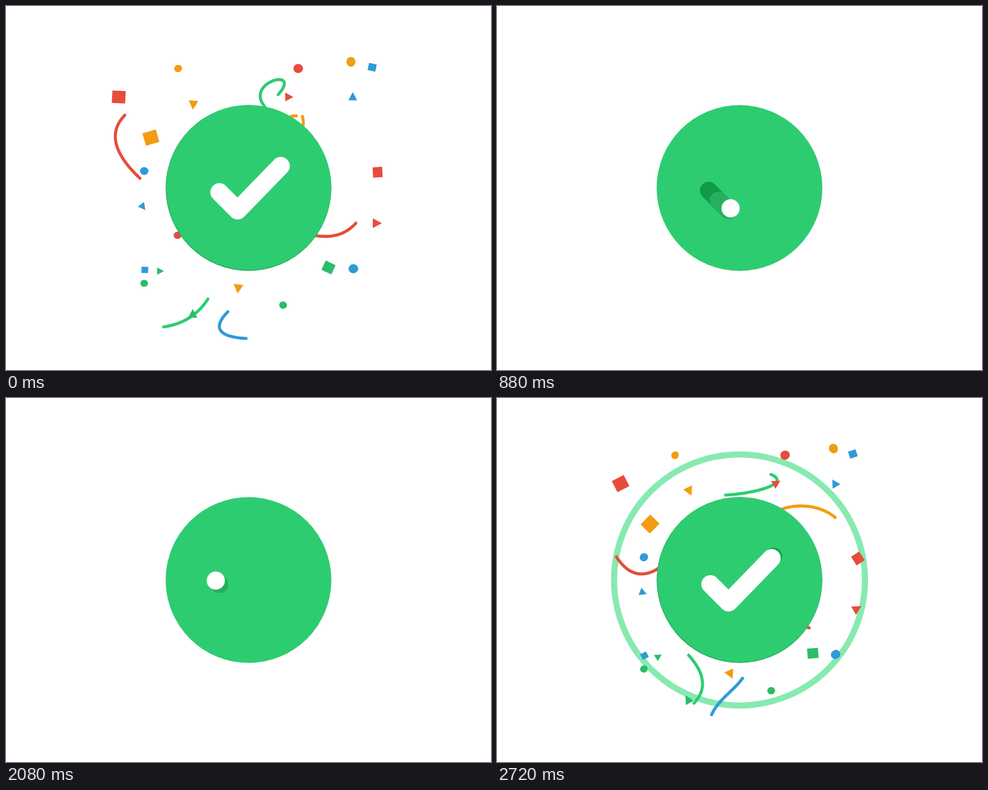
An HTML page with a canvas that plays this animation: 800 by 600 pixels, repeating every 2800 ms.

```html
<!DOCTYPE html>
<html lang="en">
<head>
<meta charset="utf-8">
<title>Success check</title>
<style>
html, body { margin: 0; width: 100%; height: 100%; overflow: hidden; background: #fff; }
canvas { display: block; width: 800px; height: 600px; }
</style>
</head>
<body>
<canvas id="stage" width="800" height="600"></canvas>
<script>
const ctx = document.getElementById('stage').getContext('2d');
const LOOP = 2800, STEP = 80, BURST = 2320, TAU = Math.PI * 2;
const CX = 400, CY = 300, RADIUS = 136.7;
const RED = '#e74c3c', ORANGE = '#f39c12', BLUE = '#2e9bd9', GREEN = '#2ecc71', LEAF = '#2bbd69';
const MID = '#27ae60', DARK = '#0f9a48';

const mix = (a, b, u) => a + (b - a) * u;
const clamp = u => Math.min(1, Math.max(0, u));
const easeOut = (u, p) => 1 - (1 - clamp(u)) ** p;
const easeInOut = u => (1 - Math.cos(Math.PI * u)) / 2;
const arch = u => Math.sin(Math.PI * clamp(u));

const dot = s => ctx.arc(0, 0, s, 0, TAU);
const square = s => ctx.rect(-s / 2, -s / 2, s, s);
const triangle = s => {
  for (let i = 0; i < 3; i++) ctx.lineTo(s * Math.cos(i * TAU / 3), s * Math.sin(i * TAU / 3));
  ctx.closePath();
};

// shape, colour, resting x, y, size, angle
const pieces = [
  [dot, ORANGE, 284, 103, 6.5, -20],
  [dot, ORANGE, 569, 92, 8, 90],
  [dot, RED, 482, 103, 8, 0],
  [dot, RED, 283, 378, 6.5, 0],
  [dot, BLUE, 228, 272, 7, 0],
  [dot, BLUE, 573, 433, 8, -5],
  [dot, LEAF, 228, 457, 6.3, 0],
  [dot, LEAF, 457, 493, 6.5, 20],
  [square, RED, 186, 150, 22, 3],
  [square, RED, 613, 274, 17, 87],
  [square, ORANGE, 239, 217, 23, -16],
  [square, BLUE, 604, 101, 13, 12],
  [square, BLUE, 229, 435, 11, 2],
  [square, LEAF, 532, 431, 18, 25],
  [triangle, ORANGE, 309, 161, 10, 95],
  [triangle, ORANGE, 383, 464, 10, 95],
  [triangle, RED, 465, 150, 9, 0],
  [triangle, RED, 610, 358, 10, 0],
  [triangle, BLUE, 572, 151, 9, -90],
  [triangle, BLUE, 225, 330, 8, 52],
  [triangle, LEAF, 253, 437, 7.5, 0],
  [triangle, LEAF, 308, 509, 9.5, -90]
];

// colour, then Bezier control points while flying and at rest
const ribbons = [
  [RED, [266, 281, 226, 306, 197, 262], [221, 284, 155, 222, 196, 180]],
  [GREEN, [377, 160, 430, 157, 485, 140, 452, 126], [427, 166, 392, 125, 490, 100, 449, 146]],
  [ORANGE, [470, 183, 500, 173, 535, 178, 558, 197], [479, 181, 440, 180, 500, 230, 489, 182]],
  [RED, [500, 375, 508, 377, 515, 379], [508, 378, 552, 386, 577, 358]],
  [BLUE, [405, 462, 390, 483, 365, 497, 354, 522], [366, 504, 345, 525, 342, 545, 396, 548]],
  [GREEN, [316, 424, 357, 469, 325, 503], [333, 483, 308, 522, 260, 529]]
];

function disc(x, y, r, color) {
  ctx.fillStyle = color;
  ctx.beginPath();
  ctx.arc(x, y, r, 0, TAU);
  ctx.fill();
}

function ring(inner, outer, color) {
  ctx.strokeStyle = color;
  ctx.lineWidth = outer - inner;
  ctx.beginPath();
  ctx.arc(CX, CY, (inner + outer) / 2, 0, TAU);
  ctx.stroke();
}

// n counts steps since the burst; pieces pass their resting place at n = 6
function piece([shape, color, x, y, size, angle], n) {
  const u = n / 6, fade = 1 - clamp((n - 7) / 5);
  const lift = 64 * u * (1 - u);
  ctx.save();
  ctx.translate(mix(CX, x, easeOut(n / 8, 2) / easeOut(6 / 8, 2)), mix(140, y, easeOut(u, 3)) - lift);
  ctx.rotate((angle + 30 * Math.min(n - 6, 2)) * Math.PI / 180);
  ctx.scale(fade, fade * .93);
  ctx.fillStyle = color;
  ctx.beginPath();
  shape(size);
  ctx.fill();
  ctx.restore();
}

function bezier(p, u) {
  while (p.length > 2) p = p.slice(2).map((v, i) => mix(p[i], v, u));
  return p;
}

function ribbon([color, flying, rest], n) {
  const trim = clamp((n - 6) / 5);
  if (n < 2 || trim === 1) return;
  const grow = easeOut(n / 5, 2), turn = clamp(n - 5);
  const pts = flying.map((v, i) => mix(mix(i % 2 ? CY : CX, v, grow), rest[i], turn));
  ctx.strokeStyle = color;
  ctx.lineWidth = 5;
  ctx.beginPath();
  for (let i = 0; i <= 40; i++) ctx.lineTo(...bezier(pts, mix(trim, 1, i / 40)));
  ctx.stroke();
}

function confetti(n) {
  if (n >= 12) return;
  ribbons.forEach(r => ribbon(r, n));
  pieces.forEach(p => piece(p, n));
}

function wave(t) {
  const u = (t - 2240) / 480;
  if (u <= 0) return;
  const inner = mix(120, 202, u), outer = mix(RADIUS, 212, easeOut(u, 2.5));
  ring(inner, outer, '#87eab0');
  if (u > .4) return;
  ring(outer - 9, outer, '#62de95');
  ring(outer - 9, outer - 4.5, '#4fd688');
}

// the check as one path measured in px from its start
const CORNER = 50.9, START = 8.5, END = 153;
const along = s => s < CORNER
  ? [346 + s * .7071, 301 + s * .7071]
  : [382 + (s - CORNER) * .697, 337 - (s - CORNER) * .717];

// trimmed span of a layer; order 0 is the white one, 1 and 2 are its shadows
function span(t, order) {
  if (t <= 640) {
    const u = easeInOut(clamp((t - 240) / 400));
    return [mix(START, 4.2, u), mix(END, 4.2, u)];
  }
  if (t <= 1240) {
    const u = (t - 640) / 600, head = mix(4.2, END, easeInOut(u));
    return [Math.max(4.2, head - 30 * order * arch(u)), head];
  }
  if (t <= 2080) {
    const u = (t - 1240) / 840, head = mix(END, 0, easeInOut(u));
    const low = order ? START : 0;
    return [Math.max(low, head), Math.min(END, Math.max(low, head + 8 * arch(u) + 32 * order * arch(u)))];
  }
  const u = clamp((t - 2080) / 660);
  return [START, mix(START, END, easeInOut(u)) + 23 * order * arch(u)];
}

function check(t, color, order) {
  const [a, b] = span(t, order);
  ctx.strokeStyle = color;
  ctx.lineWidth = order ? 28.5 : 30;
  ctx.beginPath();
  ctx.moveTo(...along(a));
  if (a < CORNER && b > CORNER) ctx.lineTo(...along(CORNER));
  ctx.lineTo(...along(b + .02));
  ctx.stroke();
}

function badge(t) {
  const scale = 1 + .107 * arch((t - 2080) / 520);
  ctx.save();
  ctx.translate(CX, CY);
  ctx.scale(scale, scale);
  ctx.translate(-CX, -CY);
  const raised = t >= 2560 || t < 400;
  disc(CX, CY, RADIUS, raised ? MID : GREEN);
  if (raised) disc(CX + .5, CY - .8, RADIUS - .7, GREEN);
  [DARK, MID, '#fff'].forEach((color, i) => check(t, color, 2 - i));
  ctx.restore();
}

function draw(t) {
  const n = (t - BURST + (t < BURST ? LOOP : 0)) / STEP;
  ctx.clearRect(0, 0, 800, 600);
  ctx.lineCap = ctx.lineJoin = 'round';
  if (n < 2) confetti(n);
  wave(t);
  if (n >= 2) confetti(n);
  badge(t);
}

function tick() {
  draw(Math.floor(performance.now() % LOOP / STEP) * STEP);
  requestAnimationFrame(tick);
}
tick();
</script>
</body>
</html>
```
